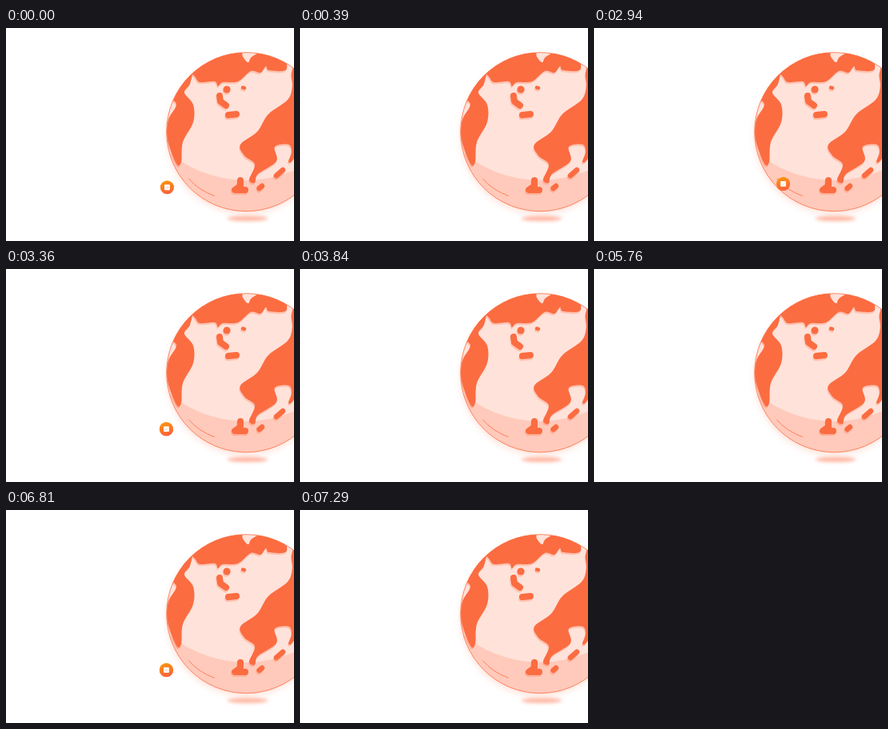
These frames come from a looping animation (360 by 267 pixels, 8 s). An HTML page:

```html
<!DOCTYPE html>
<html lang="en">
<head>
<meta charset="utf-8">
<title>Orbiting badge</title>
<style>
  html, body { margin: 0; width: 100%; height: 100%; overflow: hidden; background: #fff; }
  svg { display: block; width: 100%; height: 100%; color: #fb6c41; }
  #islands { fill: none; stroke: currentColor; stroke-linecap: round; stroke-linejoin: round; }
</style>
</head>
<body>
<svg viewBox="0 0 360 267">
  <defs>
    <clipPath id="disc"><circle cx="300.2" cy="130.2" r="99.5"/></clipPath>
    <filter id="soft" x="-30%" y="-150%" width="160%" height="400%"><feGaussianBlur stdDeviation="4"/></filter>
    <filter id="ground" x="-30%" y="-150%" width="160%" height="400%"><feGaussianBlur stdDeviation="2.3"/></filter>
    <linearGradient id="orange" x1=".3" y1="0" x2=".6" y2="1">
      <stop offset="0" stop-color="#fb960f"/>
      <stop offset="1" stop-color="#fb603c"/>
    </linearGradient>
    <g id="badge">
      <circle r="8.6" fill="url(#orange)"/>
      <rect x="-3.4" y="-3.4" width="6.8" height="6.8" rx=".8" fill="#fff"/>
      <path d="M-1.6 .1L-.3 1.3L1.7 -1" fill="none" stroke="#ffcf9e" stroke-width=".9"/>
    </g>
    <g id="land">
      <path id="coasts" fill="currentColor"/>
      <g id="islands">
        <path stroke-width="8" d="M267 85L268 92L275 97M278 109L288 108M293 191V198L286 203H299"/>
        <path stroke-width="6.5" d="M316.500 201L320 198M338 185L346 178"/>
        <path stroke-width="9" d="M276 77h.1"/>
        <path stroke-width="4.500" d="M296 74.600L298 75.200"/>
      </g>
    </g>
  </defs>

  <circle cx="299.500" cy="134.500" r="98.500" fill="currentColor" opacity=".2" filter="url(#soft)"/>
  <ellipse cx="302" cy="238.800" rx="25.500" ry="3.300" fill="#ffb7a3" filter="url(#ground)"/>

  <use id="behind" href="#badge"/>
  <g clip-path="url(#disc)">
    <circle cx="300" cy="130" r="100" fill="#ffcabb"/>
    <circle cx="300" cy="41" r="150" fill="#ffe2da"/>
    <use href="#land" x="-.8" y="2.2" opacity=".27"/>
    <use href="#land"/>
  </g>
  <g fill="none" stroke="currentColor" stroke-width=".8">
    <circle cx="300.2" cy="130.2" r="99.5"/>
    <path d="M228.500 189Q241 203.500 260.500 210.500" stroke-linecap="round"/>
  </g>
  <use id="front" href="#badge"/>
</svg>
<script>
const byId = id => document.getElementById(id);

// Key points of the north, west and east coasts; the globe's clip trims the rest.
const coasts = [
  '230,45 289,22 296,36 303,43 309,35 340,22 351,51 329,53 325,48 318,56 306,54 290,67 271,68 265,73 261,67 243,68 237,62',
  '231,55 230,70 223,81 234,96 234,118 221,143 219,168 213,170 202,140 203,115 213,96 205,83',
  '366,44 357,56 358,73 352,90 328,108 314,130 293,146 298,160 311,171 304,190 311,194 315,183 338,167 336,149 353,146 357,155 353,168 362,160 390,100'
];

// Closed Catmull-Rom curve through the points.
function smoothPath(text) {
  const points = text.split(' ').map(pair => pair.split(',').map(Number));
  const at = i => points[(i + points.length) % points.length];
  const handle = (p, a, b) => [p[0] + (b[0] - a[0]) / 6, p[1] + (b[1] - a[1]) / 6];
  const curves = points.map((p, i) => {
    const next = at(i + 1);
    return 'C' + [handle(p, at(i - 1), next), handle(next, at(i + 2), p), next].join(' ');
  });
  return 'M' + points[0] + curves.join('') + 'Z';
}

byId('coasts').setAttribute('d', coasts.map(smoothPath).join(''));

const LOOP = 8000, ORBIT = 3450, TURN = 3370;
const front = byId('front'), behind = byId('behind');

// The badge comes in over the globe, turns left of it and leaves behind it.
function draw(time) {
  const turns = (time % LOOP - TURN) / ORBIT;
  const angle = (turns - Math.round(turns)) * 2 * Math.PI;
  const inFront = angle < 0;
  const dx = (inFront ? 124.6 : 94) * (1 - Math.cos(angle));
  const bulge = (inFront ? 2.6 : 4.5) * Math.sin(angle);
  const place = `translate(${200.4 + dx} ${200.6 - 0.195 * dx - bulge})`;
  front.setAttribute('transform', place);
  behind.setAttribute('transform', place);
  front.setAttribute('opacity', inFront ? 1 : 0);
}

const start = performance.now();
function tick() {
  draw(performance.now() - start);
  requestAnimationFrame(tick);
}
tick();
</script>
</body>
</html>
```
